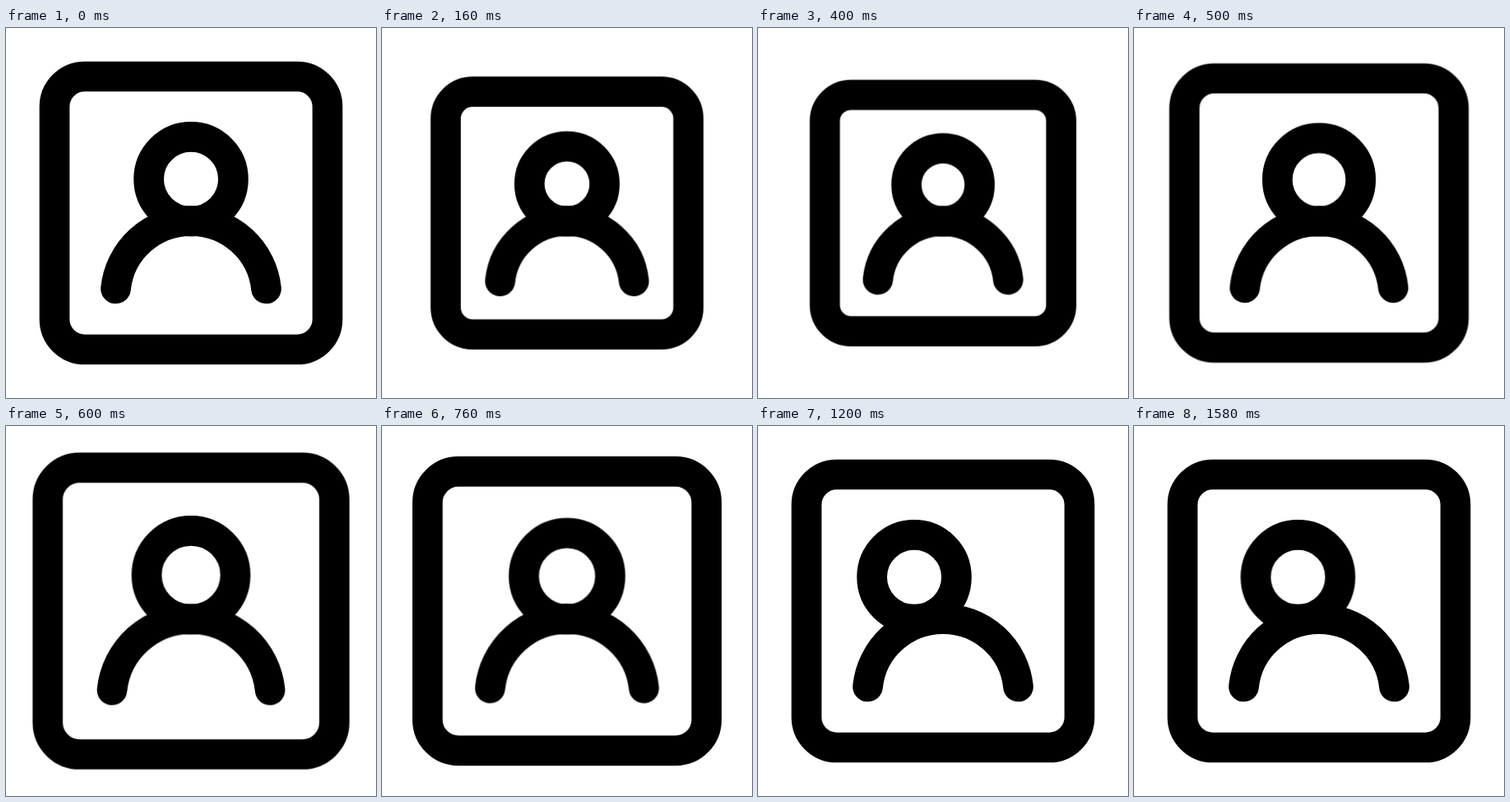
Recreate the animation shown at these times as an HTML page without scripts. Size 450 by 450 pixels, loop 1.6 s.

```html
<!DOCTYPE html>
<html lang="en">
<head>
<meta charset="utf-8">
<title>Profile icon</title>
<style>
  html, body { margin: 0; width: 100%; height: 100%; overflow: hidden; background: #fff; }
  svg { display: block; width: 450px; height: 450px; }

  .line {
    fill: none;
    stroke: #000;
    stroke-width: 36.7px;
    stroke-linecap: round;
    vector-effect: non-scaling-stroke;
    transform-origin: 225px 235.2px;
    animation: bounce 1600ms infinite;
  }
  .box { transform-origin: 225px 225px; }
  .look { animation: look 1600ms infinite; }

  .line, .look { animation-timing-function: cubic-bezier(.33333, 0, .66667, 1); }

  /* squeeze, overshoot, settle */
  @keyframes bounce {
    0% { transform: scale(1); }
    18.75% { transform: scale(.8); }
    37.5% { transform: scale(1.05); }
    56.25%, 100% { transform: scale(1); }
  }

  /* head moves left, waits, starts right and is cut by the loop */
  @keyframes look {
    0%, 56.25% { transform: translateX(0); }
    75% { transform: translateX(-35px); }
    95% { transform: translateX(-35px); animation-timing-function: cubic-bezier(.08889, 0, .17778, .18963); }
    100% { transform: translateX(-22.7px); }
  }
</style>
</head>
<body>
<svg viewBox="0 0 450 450">
  <rect class="line box" x="59" y="59" width="332" height="332" rx="36.8"/>
  <path class="line" d="M133.5 317A92 92 0 0 1 316.5 317"/>
  <g class="look">
    <circle class="line" cx="225" cy="183.8" r="51.4"/>
  </g>
</svg>
</body>
</html>
```
